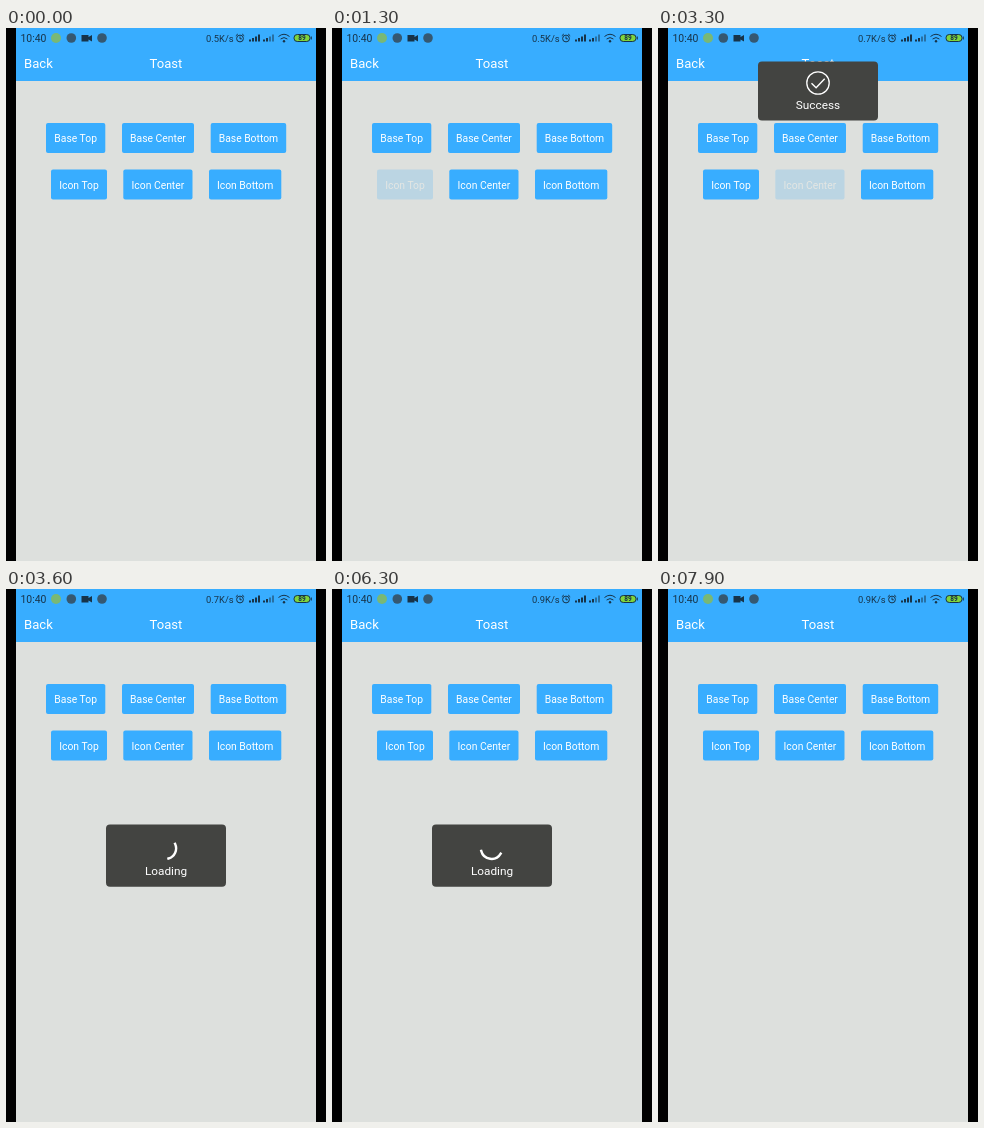
Animation, 320 px wide and 533 px high, one loop 8000 ms. Source, as an HTML page:

```html
<!DOCTYPE html>
<html lang="en">
<head>
<meta charset="utf-8">
<title>Toast demo</title>
<style>
html, body { margin: 0; width: 100%; height: 100%; overflow: hidden; background: #000; }
svg { display: block; width: 320px; height: 533px; font-family: Roboto, sans-serif; }
.ink { fill: #173348; }
.line { fill: none; stroke: #173348; }
.light { fill: #fff; }
.stroke { fill: none; stroke: #fff; }
.mid { text-anchor: middle; }
</style>
</head>
<body>
<svg viewBox="0 0 320 533">
  <rect width="320" height="533"/>
  <rect x="10" width="300" height="533" fill="#dde0dd"/>
  <rect x="10" width="300" height="53" fill="#38adff"/>

  <g class="ink">
    <text x="14.5" y="14" font-size="10.4">10:40</text>
    <circle cx="50" cy="10" r="5" fill="#79b875"/>
    <circle cx="65.3" cy="10" r="4.8" fill="#355871"/>
    <path d="M75.5 7h7v2l3.5-2v6.5l-3.5-2v2h-7z"/>
    <circle cx="96" cy="10" r="4.8" fill="#355871"/>
    <text id="speed" x="200" y="13.5" font-size="9.4"></text>
    <path d="M243 13.5v-2h2v2zM246 13.5v-3.5h2v3.5zM249 13.5v-5h2v5zM252 13.5v-7h2v7z"/>
    <path d="M257 13.5v-2h2v2zM260 13.5v-3.5h2v3.5z"/>
    <path d="M263 13.5v-5h2v5zM266 13.5v-7h2v7z" opacity=".5"/>
    <circle cx="278" cy="13.2" r="1.2"/>
  </g>
  <g class="line">
    <circle cx="234" cy="10.5" r="3.4"/>
    <path d="M234 8.5v2.3h1.8M229.8 7.8l2-1.8M238.2 7.8l-2-1.8M272.5 8.5q5.5-4.5 11 0M274.6 11q3.4-2.8 6.8 0"/>
    <rect x="288" y="6.5" width="16" height="7" rx="3.3" fill="#7fd43c"/>
    <path d="M305.3 8.5v3"/>
  </g>
  <text class="ink mid" x="296" y="12.4" font-size="6.5" font-weight="700">89</text>

  <g class="light" font-size="13.1">
    <text x="18" y="40.3">Back</text>
    <text class="mid" x="160" y="40.3">Toast</text>
  </g>
  <g id="buttons"></g>

  <g id="success">
    <rect x="100" y="33.5" width="120" height="59" rx="4" fill="#434441"/>
    <circle class="stroke" cx="160" cy="55" r="11.2" stroke-width="1.3"/>
    <path class="stroke" d="M153.5 55.3l4.6 4.5 8.6-9" stroke-width="1.4"/>
    <text class="light mid" x="160" y="81" font-size="11.8">Success</text>
  </g>
  <g id="loading">
    <rect x="100" y="235.5" width="120" height="62.3" rx="4" fill="#434441"/>
    <path id="spinner" class="stroke" stroke-width="2.4" stroke-linecap="square"/>
    <text class="light mid" x="160" y="286.3" font-size="11.8">Loading</text>
  </g>
</svg>
<script>
const LOOP = 8000;
const $ = id => document.getElementById(id);
const clamp = x => Math.min(1, Math.max(0, x));
const ramp = (t, start, length) => clamp((t - start) / length);

function addButton(label, x, y, width) {
  $('buttons').insertAdjacentHTML('beforeend', `<g>
    <rect x="${x}" y="${y}" width="${width}" height="30" rx="2" fill="#38adff"/>
    <text class="light mid" x="${x + width / 2}" y="${y + 19}" font-size="10.35">${label}</text></g>`);
  return $('buttons').lastElementChild;
}
addButton('Base Top', 40, 95, 59.3);
addButton('Base Center', 116, 95, 72);
addButton('Base Bottom', 204.7, 95, 75.5);
const iconTop = addButton('Icon Top', 45, 141.5, 56);
const iconCenter = addButton('Icon Center', 117.3, 141.5, 69.2);
addButton('Icon Bottom', 203, 141.5, 72.3);

// cubic-bezier(.4, 0, .2, 1)
function ease(x) {
  let lo = 0, hi = 1, u = 0.5;
  for (let i = 0; i < 20; i++) {
    u = (lo + hi) / 2;
    const at = 1.2 * u * (1 - u) ** 2 + 0.6 * u * u * (1 - u) + u ** 3;
    if (at < x) lo = u; else hi = u;
  }
  return u * u * (3 - 2 * u);
}

const pressOpacity = (t, down, up) => 1 - 0.8 * (ramp(t, down, 150) - ramp(t, up, 250));
const visible = (t, show, hide) => ramp(t, show, 150) - ramp(t, hide, 150);

function spinnerPath(t) {
  const phase = (((t - 6067) / 1333) % 1 + 1) % 1;
  const tail = 270 * ease(clamp(phase * 2 - 1));
  const head = 270 * ease(clamp(phase * 2));
  const turn = 14 + 0.153 * (t - 6300) + 90 * phase;
  const point = deg => {
    const a = (turn + deg) * Math.PI / 180;
    return `${159.5 + 10.6 * Math.cos(a)} ${259.3 + 10.6 * Math.sin(a)}`;
  };
  const end = Math.max(head, tail + 2);
  return `M${point(tail)}A10.6 10.6 0 ${end - tail > 180 ? 1 : 0} 1 ${point(end)}`;
}

function draw(now) {
  const t = now % LOOP;
  $('speed').textContent = `0.${t < 2800 ? 5 : t < 5400 ? 7 : 9}K/s`;
  iconTop.setAttribute('opacity', pressOpacity(t, 1130, 1380));
  iconCenter.setAttribute('opacity', pressOpacity(t, 3140, 3340));
  $('success').setAttribute('opacity', visible(t, 1450, 3450));
  $('loading').setAttribute('opacity', visible(t, 3450, 7270));
  $('spinner').setAttribute('d', spinnerPath(t));
}

const start = performance.now();
function tick() {
  draw(performance.now() - start);
  requestAnimationFrame(tick);
}
tick();
</script>
</body>
</html>
```
